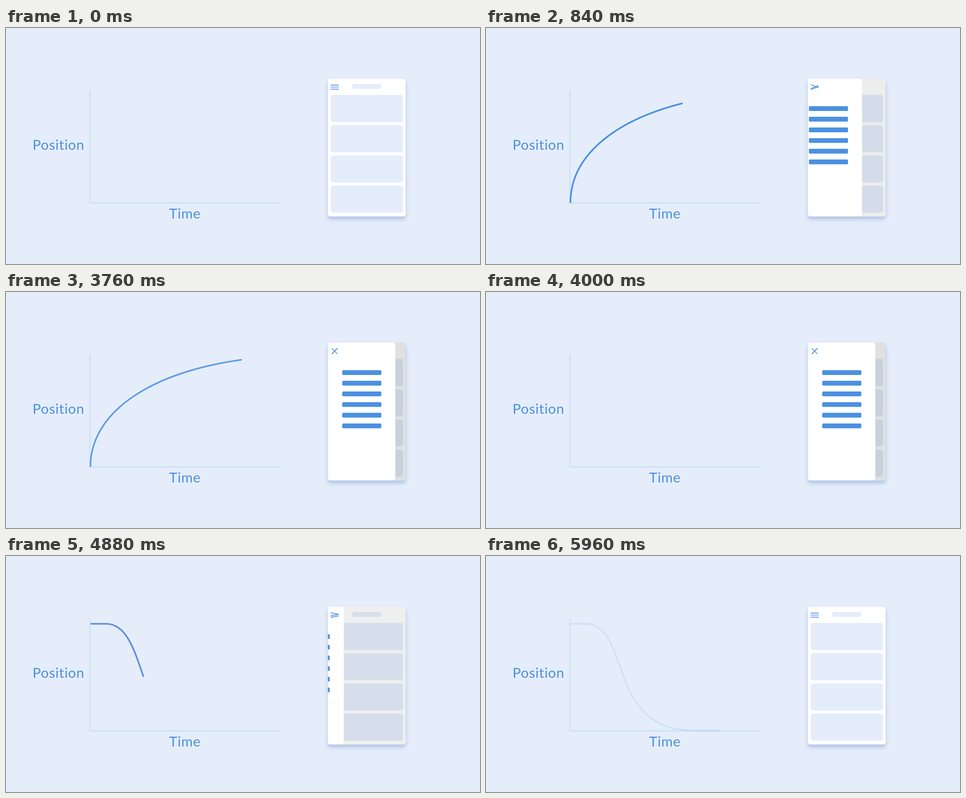
Write an HTML page that moves like this. It is 1058 px wide and 529 px high and loops after 6000 ms.

```html
<!DOCTYPE html>
<html lang="en">
<head>
<meta charset="utf-8">
<title>Menu easing curves</title>
<style>
  html, body { margin: 0; width: 100%; height: 100%; overflow: hidden; background: #e5edfb; }
  svg { display: block; width: 100%; height: 100%; }
  text { font: 31px Lato, "Open Sans", sans-serif; letter-spacing: .75px; fill: #4a90e2; }
  .curve { fill: none; stroke-width: 3.6; }
  .phone { fill: #fff; filter: drop-shadow(0 6px 5px rgba(90, 130, 185, .4)); }
</style>
</head>
<body>
<svg viewBox="0 0 1058 529">
  <defs>
    <clipPath id="screen"><rect x="718.5" y="113.5" width="173.5" height="309" rx="5"/></clipPath>
    <clipPath id="aboveAxis"><rect x="180" y="130" width="400" height="262"/></clipPath>
    <clipPath id="reveal"><rect id="revealRect" x="188.5" y="130" width="400" height="0"/></clipPath>
  </defs>

  <path d="M187.3 140V392H613.5" fill="none" stroke="#d3e4f6" stroke-width="4"/>
  <rect x="185.3" y="390" width="4" height="4" fill="#d3e4f6"/>
  <text x="59.3" y="273">Position</text>
  <text x="364" y="427">Time</text>

  <g clip-path="url(#aboveAxis)">
    <path id="openCurve" class="curve" d="M188.5 392C188.5 270 320 181 525 152"
      stroke="#4a90e2" stroke-linecap="round" pathLength="1"/>
  </g>
  <g clip-path="url(#reveal)">
    <path id="closeCurve" class="curve" stroke="#5f90da"
      d="M188 152H224C269 152 287 212 307 271C335 349 380 391 462 391H524"/>
  </g>

  <rect class="phone" x="718.5" y="113.5" width="173.5" height="309" rx="5"/>
  <g clip-path="url(#screen)">
    <g id="cards" fill="#e5edfb">
      <rect x="773" y="125.3" width="64.7" height="11.2" rx="3"/>
    </g>
    <rect id="shade" x="718" y="113" width="175" height="310"/>
    <g id="panel">
      <rect x="718.5" y="113.5" width="150.5" height="309" rx="5" fill="#fff"/>
      <g id="items" fill="#4a90e2"></g>
    </g>
    <g id="icon" stroke="#4a90e2" stroke-width="1.7">
      <path d="M-9.2 0H9.2"/><path d="M-9.2 0H9.2"/><path d="M-9.2 0H9.2"/>
    </g>
  </g>
</svg>
<script>
const LOOP = 6000, STEP = 40;
const TOP = 152, SPAN = 240;
const $ = id => document.getElementById(id);
const clamp = v => Math.min(1, Math.max(0, v));
const progress = (t, start, length) => clamp((t - start) / length);

function addRects(parent, count, x, y, pitch, width, height, radius) {
  for (let i = 0; i < count; i++) {
    const rect = document.createElementNS("http://www.w3.org/2000/svg", "rect");
    const attrs = { x, y: y + i * pitch, width, height, rx: radius };
    for (const key in attrs) rect.setAttribute(key, attrs[key]);
    parent.append(rect);
  }
}
addRects($("cards"), 4, 725, 150, 67.7, 161, 61, 5);
addRects($("items"), 6, 750.5, 175.2, 23.9, 87.3, 10.7, 2.5);

// Reads the plotted curve as an easing function: time fraction to position.
function easingFrom(path) {
  const total = path.getTotalLength();
  const first = path.getPointAtLength(0).x, last = path.getPointAtLength(total).x;
  return fraction => {
    const x = first + (last - first) * fraction;
    let low = 0, high = total;
    for (let i = 0; i < 24; i++) {
      const mid = (low + high) / 2;
      if (path.getPointAtLength(mid).x < x) low = mid; else high = mid;
    }
    return clamp((TOP + SPAN - path.getPointAtLength(low).y) / SPAN);
  };
}
const easeOpen = easingFrom($("openCurve"));
const easeClose = easingFrom($("closeCurve"));

function drawIcon(turn) {
  [...$("icon").children].forEach((bar, i) => {
    const y = 132.5 + (i - 1) * 4.6 * (1 - turn);
    const angle = (i === 0 ? 45 : -45) * turn;
    bar.setAttribute("transform", `translate(733.5 ${y}) rotate(${angle})`);
  });
}

function render(t) {
  const closing = t >= 4760;
  const openTime = progress(t, 698, 300);
  const closeTime = progress(t, 4723, 346);
  let position = 0, turn = 0, shade = 0;
  if (closing) {
    position = t < 5000 ? easeClose(closeTime) : 0;
    turn = position;
    shade = 1 - progress(t, 4760, 240);
  } else if (openTime > 0) {
    position = openTime < 1 ? easeOpen(openTime) : 1;
    turn = openTime;
    shade = progress(t, 680, 280);
  }

  $("openCurve").setAttribute("stroke-dasharray", `${position} 2`);
  $("openCurve").setAttribute("opacity", openTime > 0 && !closing ? 1 - progress(t, 3720, 280) : 0);
  $("revealRect").setAttribute("height", closing ? 49 + (t - 4800) * 1.15 : 0);
  $("closeCurve").setAttribute("opacity", closing ? 1 - progress(t, 5720, 280) : 0);

  $("panel").setAttribute("transform", `translate(${(position - 1) * 150.5} 0)`);
  $("panel").setAttribute("opacity", position > 0 ? 1 : 0);
  $("shade").setAttribute("opacity", shade * 0.122);
  drawIcon(turn);
}

const began = performance.now();
function tick() {
  const t = (performance.now() - began) % LOOP;
  render(Math.floor(t / STEP) * STEP);
  requestAnimationFrame(tick);
}
tick();
</script>
</body>
</html>
```
